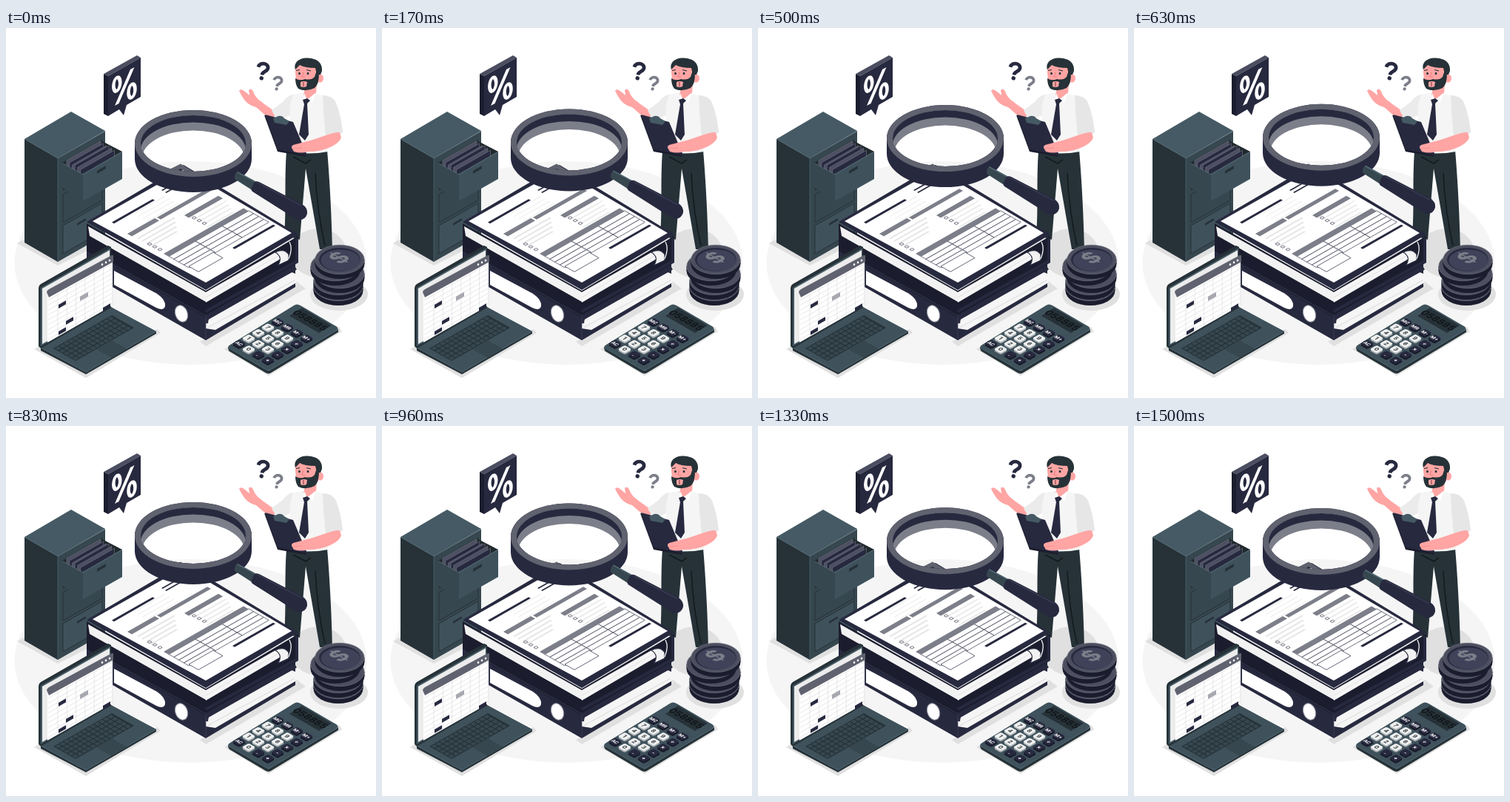
An HTML page with a canvas that plays this animation: 500x500 px, repeating every 1.54 s.

```html
<!DOCTYPE html>
<html lang="en">
<head>
<meta charset="utf-8">
<style>
html, body { margin: 0; width: 100%; height: 100%; overflow: hidden; background: #fff; }
canvas { display: block; width: 500px; height: 500px; }
</style>
</head>
<body>
<canvas id="stage"></canvas>
<script>
const SIZE = 500, LOOP = 1540, LIFT = 8.5, PEAK = 720, ISO = 0.57;
const NAVY = '#27293f', INK = '#1b1d2e', RIM = '#60626f', GREY = '#7c7e89', DARK = '#263238', SLATE = '#37474f',
  TEAL = '#3f525c', STEEL = '#455a64', SKIN = '#ffa5a4', LINE = '#e0e0e0', PAPER = '#f5f5f5';
const ratio = window.devicePixelRatio || 1;
const canvas = document.getElementById('stage');
const view = setup(canvas);
const still = document.createElement('canvas');
let c = setup(still);

function setup(target) {
  target.width = target.height = SIZE * ratio;
  const context = target.getContext('2d');
  context.scale(ratio, ratio);
  return context;
}

function shape(d, fill, stroke, width = 1) {
  const path = new Path2D(d);
  if (fill) { c.fillStyle = fill; c.fill(path); }
  if (stroke) { c.strokeStyle = stroke; c.lineWidth = width; c.stroke(path); }
}
const poly = (points, fill, stroke, width) => shape('M' + points + 'Z', fill, stroke, width);

function oval(x, y, rx, ry, fill, stroke, width = 1) {
  c.beginPath();
  c.ellipse(x, y, rx, ry, 0, 0, Math.PI * 2);
  if (fill) { c.fillStyle = fill; c.fill(); }
  if (stroke) { c.strokeStyle = stroke; c.lineWidth = width; c.stroke(); }
}

// Flat tile: a runs up to the right, b runs down to the right.
function tile(x, y, a, b, fill, stroke, width) {
  poly(`${x} ${y}L${x + a} ${y - ISO * a}L${x + a + b} ${y + ISO * (b - a)}L${x + b} ${y + ISO * b}`, fill, stroke, width);
}

// Upright panel whose top edge rises to the right.
function panel(x, y, w, h, fill, stroke, width) {
  poly(`${x} ${y}L${x + w} ${y - ISO * w}V${y - ISO * w + h}L${x} ${y + h}`, fill, stroke, width);
}

// Lettering lying on the floor plane; flip turns it to read up to the right.
function floorText(text, x, y, size, fill, flip = 1) {
  c.save();
  c.transform(1.3, 0.74 * flip, -1.3 * flip, 0.75, x, y);
  c.font = `700 ${size}px Inter, sans-serif`;
  c.textAlign = 'center';
  c.textBaseline = 'middle';
  c.fillStyle = fill;
  c.fillText(text, 0, 0.3);
  c.restore();
}

function floor() {
  oval(249.5, 317.5, 238, 137.5, PAPER);
  poly('15 291L25 285L72 310L120 284L132 290L70 321', LINE);
  oval(422, 304, 38, 33, LINE);
  poly('262 424L393 343L405 352L270 430', LINE);
  poly('38 434L50 427L110 462L205 407L209 412L108 473', LINE);
  poly('295 434L305 428L356 462L450 404L454 410L355 470', LINE);
  oval(450, 360, 39, 22, LINE);
}

function cabinet() {
  poly('25 150L88 113L134 139L70 176', STEEL);
  poly('25 150L70 176V316L25 290', DARK);
  panel(70, 176, 64, 140, SLATE);
  shape('M25 150L70 176L134 139M70 176V316', null, '#536a75', 0.7);
  panel(77, 181, 53, 39, DARK);
  panel(77, 225, 53, 38, SLATE, DARK, 1);
  panel(77, 267, 53, 38, TEAL, DARK, 1);
  shape('M96 264V267L108 260V257Z', DARK);
  poly('77 183L104 198V234L77 216', SLATE);
  poly('77 183L130 153L157 167L104 198', '#20292e');
  for (let i = 0; i < 6; i++) {
    const x = 82 + i * 3.7, y = 179 + i * 2.1 + (i % 3);
    panel(x, y, 46, 13 - i, i % 2 ? NAVY : '#4d4f62', '#787a86', 0.6);
  }
  poly('77 183L104 198V234L77 216', SLATE);
  poly('104 197L157 167V204L104 234', TEAL);
  shape('M77 183L104 198L157 167', null, '#5a707b', 0.8);
  shape('M123 193V197L135 190V186Z', DARK);
}

function percentTag() {
  poly('132 62L177 37L182 40L138 65', '#4b4d60');
  poly('132 62L138 65V119L132 116', INK);
  shape('M138 65L182 40V93L163 104L159 118L153 110L138 119Z', NAVY);
  c.save();
  c.transform(1, -0.5, 0, 1, 0, 0);
  oval(149.8, 151, 4.5, 9, null, '#fff', 4.5);
  oval(170, 170, 4.5, 9, null, '#fff', 4.5);
  c.restore();
  poly('168 56L173.5 53L152.5 102L147 105', '#fff');
}

function question(x, y, scale, color) {
  c.save();
  c.translate(x, y);
  c.scale(scale, scale);
  c.rotate(0.2);
  shape('M-7 -4C-6 -12 7 -12 6 -4C5 1 0 0 0 5.5', null, color, 4.8);
  oval(0.2, 10, 2.7, 2.7, color);
  c.restore();
}

function man() {
  shape('M379 166L434 165C437 200 440 250 441 299L424 299L405 190L397 286L376 280C379 245 376 205 379 166Z', DARK);
  shape('M388 174L405 183L412 178M418 196Q420 245 431 294', null, '#141b1e', 1.6);
  // raised arm
  shape('M354 121L338 107C326 104 321 97 315 85Q317 81 323 86L329 91L328 84Q332 80 335 88C338 95 343 98 348 102L365 114L358 131Z', SKIN);
  shape('M389 90Q381 90 374 100L359 111Q363 121 371 124L388 116Z', '#ebebeb');
  shape('M388 90L404 87L429 91Q438 98 439 113L435 167Q410 172 380 167Q386 125 383 108Z', PAPER);
  shape('M428 91Q441 91 446 101Q453 119 455 141Q443 149 432 147L429 112Z', '#e6e6e6');
  shape('M405 78L420 72L419 89L407 96L402 90Z', SKIN);
  shape('M403 88L407 97L401 101ZM419 87L407 97L414 101Z', '#fff');
  shape('M401 97L407 95L411 98L407 102L409 144L404 152L396 144L403 103Z', NAVY);
  // head
  shape('M391 50Q405 43 420 52L422 74Q411 88 397 81Q390 72 391 50Z', SKIN);
  oval(424.5, 68, 4.5, 5.5, SKIN);
  shape('M391 68Q397 72 404 69Q413 71 417 66L420 57L423 62Q423 76 417 81Q405 87 395 82Q391 77 391 68Z', DARK);
  shape('M391 56C388 46 397 40 408 40.5C420 41 428 47 427 58L425 63L420 63L418 54Q404 54 397 50Z', DARK);
  shape('M398 73Q403 71 407 73L406 79Q402 81 398 79Z', SKIN);
  shape('M402 73V79', null, '#7a4a4d', 1.2);
  oval(396.5, 61.5, 1.4, 1.8, DARK);
  oval(408, 61.5, 1.4, 1.8, DARK);
  shape('M392 57.5L397 56.5M406 56.5L412 58', null, DARK, 1.2);
  shape('M402 60L400 66L404 66', null, '#e87c7f', 1);
  // clipboard and lower arm
  poly('349 118L387 129L406 174L367 167', INK);
  poly('350 117L388 127L407 172L367 164', NAVY);
  shape('M361 122L368 119Q373 118 376 122L383 126L379 131L363 128Z', STEEL);
  shape('M451 141C442 140 424 149 407 153L392 157Q385 158 386 162L389 167Q399 170 408 167C424 168 449 160 453 148Z', SKIN);
  shape('M387 163L400 162', null, '#e88b8c', 0.7);
}

function coins() {
  const stack = [[449, 349], [449, 341], [451, 332], [445, 322], [451, 313]];
  for (const [x, y] of stack) {
    oval(x, y + 6, 33.5, 20, INK);
    c.fillStyle = INK;
    c.fillRect(x - 33.5, y, 67, 6);
    oval(x, y, 33.2, 19.7, '#4d4f60', '#686a78', 0.8);
  }
  oval(451, 313, 28, 16, NAVY);
  oval(452, 314, 26.5, 14.5, '#40425a');
  floorText('$', 451, 311, 19, GREY, -1);
}

function binders() {
  // lower binder
  poly('109 286L270 375L391 318V350L270 422L109 330', NAVY);
  poly('109 284L270 374V391L109 301', INK);
  poly('270 396L386 330L391 332V345L283 408L270 406', PAPER);
  shape('M272 405L390 341', null, LINE, 1.2);
  shape('M271 399Q272 384 284 386', null, NAVY, 4);
  shape('M270 390L391 323', null, NAVY, 8);
  shape('M146 328L204 359Q216 367 215 376Q213 383 203 378L146 347Z', '#fff');
  shape('M142 318L270 389V420', null, '#45475b', 0.7);
  c.save();
  c.translate(237, 386);
  c.rotate(-0.35);
  oval(0, 0, 8.2, 11.5, '#fff', '#8b8d98', 1);
  c.restore();

  // upper binder
  poly('109 264L270 355L395 281V317L270 388L109 294', INK);
  shape('M270 383L393 315V284', null, NAVY, 4);
  poly('111 268L270 357V370L113 281', '#f2f2f2');
  poly('270 357L366 302Q374 305 371 312L270 371', PAPER);
  shape('M270 364L369 307', null, LINE, 0.8);
  shape('M364 303Q376 297 382 306L382 314L367 321Q375 310 364 303Z', '#f2f2f2', NAVY, 1.2);
  shape('M383 289Q388 298 382 312', null, PAPER, 1.3);
  poly('109 262L240 185L395 279L270 354', NAVY);
  poly('117 261L241 191L386 277L270 344', '#fff');
  poly('221 191L236 183.5L253 194L247 198L236 190L227 195', RIM);
}

function form() {
  tile(143, 262.5, 55, 3, NAVY);
  tile(210, 219, 22, 1.7, NAVY);
  tile(215, 222, 22, 1.7, NAVY);
  tile(306, 297, 55, 3, NAVY);
  tile(164, 278, 37, 6, GREY);
  tile(204, 256, 68, 5, GREY);
  tile(241, 253, 46, 6, GREY);
  for (let i = 0; i < 4; i++) {
    tile(172 + i * 6, 251 + i * 3.4, 42, 1, '#ededed');
    tile(177 + i * 6, 284 + i * 3.4, 50 - i * 5, 2, '#e6e6e6');
    tile(253 + i * 6, 258 + i * 3.4, 44 - i * 3, 2, '#ececec');
  }
  for (let i = 0; i < 3; i++) {
    tile(191 + i * 7, 292 + i * 3.7, 3.2, 3, '#fff', '#555766', 0.8);
    tile(251 + i * 7, 256.5 + i * 3.7, 3.2, 3, '#fff', '#555766', 0.8);
  }
  const x = 220, y = 308.5, depth = 6.8;
  for (let row = 0; row < 4; row++) {
    for (let col = 0; col < 3; col++) {
      const a = col * 36, b = row * depth;
      tile(x + a + b, y + ISO * (b - a), 36, depth, '#fff', NAVY, 0.65);
    }
  }
  tile(213, 305, 108, 7, GREY);
  tile(247, 322, 33, 13, '#fff', NAVY, 0.7);
}

function laptop() {
  poly('47 433L142 378L203 410V413L108 468L47 436', DARK);
  poly('47 432L142 377L203 410L108 465', TEAL);
  shape('M47 432L108 465L203 410', null, '#5a707b', 0.8);
  shape('M44 351Q44 348 47 346L138 294L142 296V378L47 433L44 430Z', DARK);
  panel(47, 351, 94, 79, STEEL);
  panel(49, 352, 91, 75, '#ececec');
  panel(56, 361, 88, 64, '#fff');
  for (let i = 0; i < 9; i++) shape(`M57 ${368 + i * 6.6}L144 ${318.4 + i * 6.6}`, null, '#d9d9dc', 0.6);
  for (let i = 0; i < 7; i++) {
    const px = 70 + i * 12.3;
    shape(`M${px} ${361 - (px - 57) * ISO}V${424 - (px - 57) * ISO}`, null, '#d9d9dc', 0.6);
  }
  panel(71, 374, 10, 5, NAVY);
  panel(81, 396, 10, 5, NAVY);
  panel(71, 410, 10, 5, NAVY);
  panel(131, 378, 10, 5, NAVY);
  panel(100, 363, 11, 6, '#a6a7af');
  shape('M55 357Q55 355 58 353L143 307Q145 306 145 309V316L58 364Z', RIM);
  for (let i = 0; i < 3; i++) oval(130 + i * 5, 319.5 - i * 2.8, 1.3, 1.5, '#fff');
  tile(64, 433, 79, 30, DARK);
  for (let row = 0; row < 5; row++) {
    for (let key = 0; key < 13; key++) {
      const a = key * 5.9 + 1, b = row * 5.8 + 1;
      tile(64 + a + b, 433 + ISO * (b - a), 4.7, 4.6, SLATE);
    }
  }
  tile(122, 434, 21, 20, SLATE);
}

function calculator() {
  shape('M300 431L355 463L449 407V411L358 466Q355 468 351 466L302 437Q300 435 300 431Z', DARK);
  shape('M303 428L389 375Q393 372 398 375L446 403Q451 406 446 409L359 461Q355 464 350 461L302 433Q298 431 303 428Z', TEAL);
  shape('M300 432L352 462Q355 464 359 461L448 408', null, '#56707b', 0.7);
  poly('383 389L400 378L440 402L423 412', DARK);
  floorText('058885', 411, 395, 8.5, '#11171b');
  const rows = [['MC', 'MR', 'M-', 'M+'], ['7', '8', '9', '÷'], ['4', '5', '6', '×'],
    ['1', '2', '3', '-'], ['AC', '0', '.', '+']];
  rows.forEach((labels, row) => labels.forEach((label, col) => {
    const x = 367 + 13 * (col - row), y = 397 + 7.4 * (col + row);
    const light = /\d/.test(label);
    for (const drop of [2, 0]) {
      c.save();
      c.transform(1.3, 0.74, -1.3, 0.75, x, y + drop);
      c.beginPath();
      c.roundRect(-3.6, -3.6, 7.2, 7.2, 1.4);
      c.fillStyle = drop ? (light ? '#aeb4b7' : '#161826') : (light ? '#f0f0f0' : NAVY);
      c.fill();
      c.restore();
    }
    floorText(label, x, y, label.length > 1 ? 4.3 : 5, light ? DARK : '#fff');
  }));
}

function magnifier() {
  c.lineCap = 'round';
  // outer wall and top rim, leaving the lens open
  c.beginPath();
  c.moveTo(174, 156);
  c.lineTo(174, 177);
  c.ellipse(253, 177, 79, 45, 0, Math.PI, 0, true);
  c.lineTo(332, 156);
  c.ellipse(253, 156, 79, 45, 0, 0, Math.PI, true);
  c.closePath();
  c.moveTo(324, 156);
  c.ellipse(253, 156, 71, 38, 0, 0, Math.PI * 2);
  c.fillStyle = NAVY;
  c.fill('evenodd');
  ring(253, 156, 79, 45, 71, 38, RIM);

  c.save();
  c.beginPath();
  c.ellipse(253, 156, 71, 38, 0, 0, Math.PI * 2);
  c.clip();
  ring(253, 176, 90, 90, 69, 37.5, GREY);
  ring(253, 165.5, 90, 90, 71, 38, NAVY);
  c.restore();

  shape('M313 194L340 209L334 220L309 204Q308 197 313 194Z', SLATE);
  shape('M313 195L339 209', null, '#536a75', 1.5);
  shape('M333 214Q335 205 342 208L400 238Q408 243 407 251Q404 261 393 259L333 221Q330 218 333 214Z', NAVY);
  shape('M340 209L399 240', null, '#3c3e54', 1.2);
  c.lineCap = 'butt';
}

function ring(x, y, rx, ry, holeX, holeY, fill) {
  c.beginPath();
  c.ellipse(x, y, rx, ry, 0, 0, Math.PI * 2);
  c.moveTo(x + holeX, y);
  c.ellipse(x, y, holeX, holeY, 0, 0, Math.PI * 2);
  c.fillStyle = fill;
  c.fill('evenodd');
}

c.fillStyle = '#fff';
c.fillRect(0, 0, SIZE, SIZE);
floor();
cabinet();
percentTag();
question(347, 58, 1, NAVY);
question(367, 74.5, 0.8, GREY);
man();
coins();
binders();
form();
laptop();
calculator();
c = view;

function draw(now) {
  const phase = 2 * Math.PI * ((now % LOOP) - PEAK) / LOOP;
  c.drawImage(still, 0, 0, SIZE, SIZE);
  c.save();
  c.translate(0, -LIFT * (1 + Math.cos(phase)) / 2);
  magnifier();
  c.restore();
  requestAnimationFrame(draw);
}
draw(0);
</script>
</body>
</html>
```
